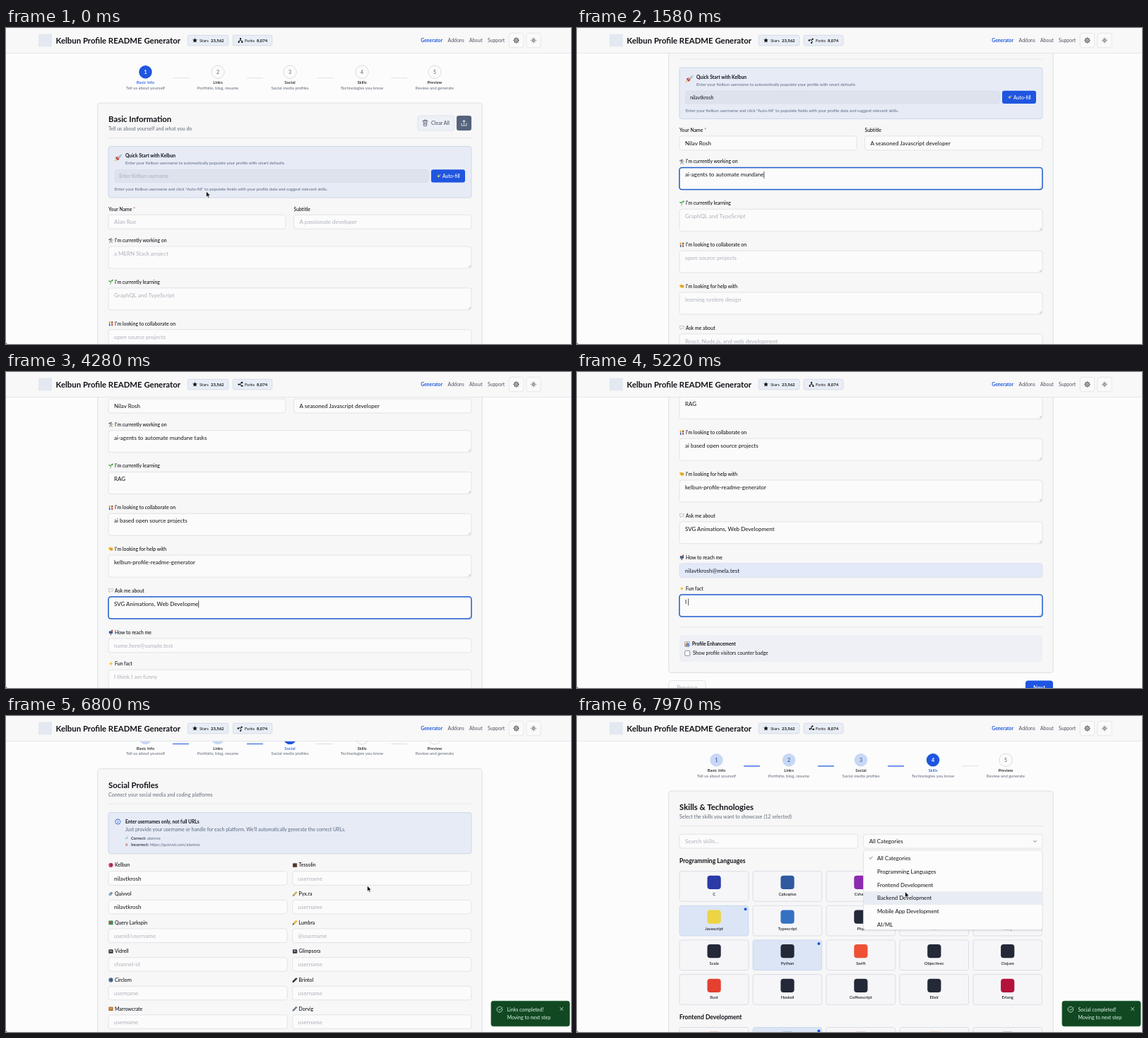
These frames come from a looping animation (800x447 px, 8000 ms). An HTML page:

```html
<!DOCTYPE html>
<html lang="en">
<head>
<meta charset="utf-8">
<title>Profile README Generator</title>
<style>
html, body { margin: 0; width: 100%; height: 100%; overflow: hidden; background: #fcfcfc; }
svg { display: block; width: 100%; height: 100%; }
text { font-family: Lato, "Open Sans", sans-serif; white-space: pre; }
</style>
</head>
<body>
<svg id="stage" viewBox="0 0 800 447"></svg>
<script>
const LOOP = 8000;
const BLUE = '#1f56e0', INK = '#111318', GREY = '#626a7a', PALE = '#adb2bc', LINE = '#dddfe5';
const BRAND = 'Kelbun', USER = 'nilavtkrosh';

// Drawing helpers
const T = (x, y, s, size, fill = INK, weight = 400, anchor = 'start') =>
  `<text x="${x}" y="${y}" font-size="${size}" fill="${fill}" font-weight="${weight}" text-anchor="${anchor}">${s}</text>`;
const R = (x, y, w, h, fill, stroke = 'none', rx = 3) =>
  `<rect x="${x}" y="${y}" width="${w}" height="${h}" rx="${rx}" fill="${fill}" stroke="${stroke}" stroke-width=".8"/>`;
const C = (x, y, r, fill, stroke = 'none') =>
  `<circle cx="${x}" cy="${y}" r="${r}" fill="${fill}" stroke="${stroke}" stroke-width=".8"/>`;
const P = (d, fill, stroke = 'none', w = .8) =>
  `<path d="${d}" fill="${fill}" stroke="${stroke}" stroke-width="${w}" stroke-linecap="round" stroke-linejoin="round"/>`;
const at = (x, y, body, scale = 1) => `<g transform="translate(${x} ${y}) scale(${scale})">${body}</g>`;
const head = (x, y, s, size) => T(x, y, s, size, INK, 700);
const rule = y => P(`M145 ${y}H659`, 'none', '#e2e4e8');

// Emoji in an 8 x 8 box
const EMOJI = {
  rocket: P('M2 6 5 2 8 0 7 3 3 7Z', '#b9c0cc') + P('M1 4 4 3 2 6ZM4 7 5 4 2 6Z', '#c8372d') + P('M0 8 1 6 2 7Z', '#f5a623'),
  scope: P('M0 2 5 0 6 2 1 4Z', '#7c8796') + P('M4 3 2 8M4 3 6 8', 'none', '#444b57') + C(7, 3.5, 1, '#d9a05b'),
  plant: P('M4 4Q1 5 0 2 3 1 4 4ZM4 3Q4 0 8 0 8 4 4 3Z', '#4caf50') + P('M4 3Q5 6 3 8', 'none', '#3f8f43'),
  pair: C(2, 2, 1.5, '#e3a63c') + C(6, 2, 1.5, '#8a5a2b') + P('M1 4H3V8H1Z', '#3c6fb5') + P('M5 4H7V8H5Z', '#c0503f'),
  hands: P('M0 2 3 1 8 3 7 6 4 7 1 5Z', '#f2b233') + P('M3 4 5 3 6 5', 'none', '#b97a16'),
  chat: P('M1 1H7V5H4L2 7V5H1Z', '#f4f5f7', '#a7adb8', .7),
  mail: P('M1 2H7V6H1Z', '#3a5f8f') + P('M5 0H7V3H5Z', '#c8372d') + P('M4 6V8', 'none', '#5c4632', 1.2),
  bolt: P('M5 0 1 5H4L3 8 7 3H4Z', '#f3b72b'),
  chart: R(0, 0, 8, 8, '#e4e7ec', '#8b93a1', 1) + P('M2 7V4', 'none', '#3b9a4c', 1.4) + P('M4 7V2', 'none', '#c8372d', 1.4) + P('M6 7V3', 'none', BLUE, 1.4),
};
const MINI = {
  o: (a, b) => C(4, 4, 3.6, a) + C(5, 3.4, 1.4, b),
  s: (a, b) => R(.4, 1, 7.2, 6.4, a, 'none', 1) + R(2, 2.4, 3.6, 2.6, b, 'none', .4),
  p: (a, b) => P('M0 8 1 5 6 0 8 2 3 7Z', a) + P('M0 8 1 5 3 7Z', b),
  b: (a, b) => P('M1 7Q0 3 3 2 5 0 6 2L8 3 6 4Q6 7 1 7Z', a) + C(5, 2.4, .7, b),
};
const emoji = key => EMOJI[key] || MINI[key[0]](...key.slice(1).split(','));

const label = (x, y, s, icon) =>
  (icon ? at(x, y - 6, emoji(icon), .87) : '') + T(icon ? x + 9 : x, y, s, 6.9, INK, 500);

// Group children: box, placeholder, value, caret, resize grip
const field = (id, x, y, w, h, hint, value = '', o = {}) => {
  const tx = x + (o.pad || 8), ty = y + (o.base || 12.9), size = o.size || 8;
  const grip = h > 25 ? P(`M${x + w - 4} ${y + h - 1.5}l2.6-2.6M${x + w - 2.4} ${y + h - 1.5}l1-1`, 'none', '#858a94', .5) : '';
  return `<g id="${id}" data-x="${tx}">` + R(x, y, w, h, o.fill || '#fbfbfb', o.fill ? '#d8deea' : LINE, 3.5) +
    T(tx, ty, value ? '' : hint, size, o.fill ? '#a5aec0' : PALE) + T(tx, ty, value, size) +
    P(`M0 ${ty - 7}v9`, 'none', 'none', .7) + grip + '</g>';
};

const STEPS = [['Basic Info', 'Tell us about yourself'], ['Links', 'Portfolio, blog, resume'], ['Social', 'Social media profiles'],
  ['Skills', 'Technologies you know'], ['Preview', 'Review and generate']];
const STEP_X = [197.5, 300, 402, 504, 607];
const steps = active => STEPS.map(([name, sub], i) => {
  const x = STEP_X[i], on = i === active, done = i < active;
  return C(x, 62.2, 9.2, on ? BLUE : done ? '#c8d8f4' : '#fbfbfb', on || done ? 'none' : '#cfd3dc') +
    T(x, 64.7, i + 1, 7, on ? '#fff' : done ? '#2a4fa8' : GREY, on ? 700 : 500, 'middle') +
    T(x, 79, name, 5.95, on ? BLUE : INK, 500, 'middle') + T(x, 86.8, sub, 5.95, GREY, 400, 'middle') +
    (i < 4 ? P(`M${[236.5, 341.5, 440.5, 545.5][i]} 70.8h22`, 'none', done ? BLUE : '#d9dce3', done ? 1.2 : .9) : '');
}).join('');

const footer = y => {
  const cols = [['About', `Create an awesome ${BRAND} profile README with ease.`], ['Quick Links', 'Generator'],
    ['Resources', BRAND + ' Repository'], ['Connect', BRAND]];
  return R(0, y, 800, 260, '#f7f7f7', '#dfe1e6', 0) + R(313.5, y + 16, 22, 22, '#e6e9f1', 'none', 1) +
    head(341.5, y + 30.7, BRAND + ' Profile README Generator', 9.4) +
    cols.map(([h, s], i) => head(46.5 + i * 181.5, y + 61.8, h, 7.4) + T(46.5 + i * 181.5, y + 78, s, 6.95, GREY)).join('') +
    T(46.5, y + 87, 'Made with', 6.95, GREY) + P(`M83.5 ${y + 87}l-3-3q0-3 3-1 3-2 3 1Z`, '#d93a3a') +
    T(89, y + 87, 'for the developer community.', 6.95, GREY);
};

const page = (i, title, sub, bottom, body) => `<g id="page${i}">` + steps(i) +
  R(129.8, 106, 544.4, bottom - 106, '#f7f7f7', '#d5d8e0', 4) +
  head(145, 133, title, 11.4) + T(145, 145.4, sub, 7.05, GREY) + rule(155.5) + body +
  R(129.8, bottom + 11, 52.5, 20, '#fbfbfb', LINE, 4) +
  T(156, bottom + 23.8, 'Previous', 7.9, i ? INK : PALE, 400, 'middle') +
  R(635, bottom + 11, 39, 20, BLUE, 'none', 4) + T(654.5, bottom + 23.8, 'Next', 8, '#fff', 500, 'middle') +
  footer(bottom + 46) + '</g>';

const extra = (y, icon, title, text) => rule(y) + R(145, y + 11.8, 514, 37.4, '#eef0f5') +
  at(152.5, y + 21, emoji(icon), .87) + head(163, y + 26.6, title, 6.7) +
  R(152.8, y + 33.8, 7, 7, '#fff', '#6f7480', 1) + T(164, y + 39.6, text, 6.95);

// Step pages
const AREAS = [['work', 309, 'scope', "I'm currently working on", 'a MERN Stack project'],
  ['learn', 367.8, 'plant', "I'm currently learning", 'GraphQL and TypeScript'],
  ['collab', 426.6, 'pair', "I'm looking to collaborate on", 'open source projects'],
  ['help', 485.4, 'hands', "I'm looking for help with", 'learning system design'],
  ['ask', 544.3, 'chat', 'Ask me about', 'React, Node.js, and web development'],
  ['fun', 647.5, 'bolt', 'Fun fact', 'I think I am funny']];

const basic = page(0, 'Basic Information', 'Tell us about yourself and what you do', 758,
  R(583, 124, 51.5, 21, '#edf0f6', '#d7ddea') + T(602, 137.4, 'Clear All', 7.1, '#414b5e') +
  P('M590 131.5h7M592 131.5v-1.4h3v1.4M591 131.5l.5 7h4l.5-7M592.8 133.5v3M594.3 133.5v3', 'none', '#414b5e', .7) +
  R(638, 124, 21, 21, '#55637c') + P('M645 135v3h7v-3M648.5 136v-5.5M646.3 132.5l2.2-2.2 2.2 2.2', 'none', '#fff') +
  R(145, 167.5, 514, 72.5, '#e6ebf5', '#c5d1e8') + at(153.5, 177.5, emoji('rocket'), 1.4) +
  head(169, 183.2, `Quick Start with ${BRAND}`, 6.7) +
  T(169, 193.2, `Enter your ${BRAND} username to automatically populate your profile with smart defaults`, 5.97, '#5c6984') +
  field('user', 153.7, 200.5, 444.5, 18, `Enter ${BRAND} username`, '', { fill: '#dde2ec', pad: 6.5, size: 6.9, base: 11.8 }) +
  R(602, 200.3, 48, 18.2, BLUE) + T(618, 212, 'Auto-fill', 6.9, '#fff', 500) +
  P('M612.5 207l.7 1.8 1.8.7-1.8.7-.7 1.8-.7-1.8-1.8-.7 1.8-.7Z', '#f0cf62') + C(614.8, 207.6, .6, '#fff') +
  T(153.7, 230, `Enter your ${BRAND} username and click "Auto-fill" to populate fields with your profile data and suggest relevant skills.`, 6, '#5c6984') +
  label(145, 258.7, 'Your Name <tspan fill="#c0504d">*</tspan>') + label(407.5, 258.7, 'Subtitle') +
  field('name', 145, 264.3, 251, 20, 'Alan Roe') + field('sub', 407.5, 264.3, 251.5, 20, 'A passionate developer') +
  AREAS.map(([id, y, icon, text, hint]) => label(145, y - 6.1, text, icon) + field(id, 145, y, 514, 31, hint)).join('') +
  label(145, 597, 'How to reach me', 'mail') + field('mail', 145, 603.2, 514, 20, 'name.here@sample.test') +
  extra(693, 'chart', 'Profile Enhancement', 'Show profile visitors counter badge'));

const links = page(1, 'Links', 'Share your portfolio, blog and resume', 344,
  [['folio', 'Portfolio URL', 'o#4a90d9,#7cc47f'], ['blog', 'Blog URL', 'p#f0c04a,#555'], ['cv', 'Resume URL', 's#e8eaee,#8b93a1']]
    .map(([id, text, icon], i) => label(145, 176 + i * 46, text, icon) +
      field(id, 145, 182 + i * 46, 514, 20, 'https://...')).join(''));

const SOCIAL = [[BRAND, 'o#c2416b,#7b2440', USER], ['Tessolin', 's#6a4a36,#3d2a1f'], ['Quivvol', 'b#8aa3b8,#39495a', USER], ['Pyx.ra', 'p#c9b458,#5f8f52'],
  ['Query Larkspin', 's#3f8d58,#c0503f', '', 'userid/username'], ['Lumbra', 'p#e8b13c,#4b3a26', '', '@username'],
  ['Vidrell', 's#32363e,#8c96a5', '', 'channel-id'], ['Glimpsora', 's#30343c,#8b93a1'], ['Circlorn', 'o#51708f,#2d4864'], ['Brintol', 'p#32363e,#111'],
  ['Marrowcrate', 's#b0723c,#d9a05b'], ['Dorvig', 'p#70808f,#3a5f8f'], ['Nimbrost', 'o#4a90d9,#fff'], ['Quandrel', 's#d69a2d,#333'],
  ['Bravorithm', 'bolt'], ['Snackril', 'p#d98a2b,#c0503f'], ['Apexorin', 'o#e3ab33,#c8372d'], ['Orbantalis', 'o#2f6fb5,#4caf50', '', '@username'],
  ['Learnwithelk', 'o#4caf50,#e8b13c'], ['Swatchel', 'o#b0723c,#c8372d'], ['Ardwell', 's#3a5f8f,#d98a2b'], ['Yapplin', 'chat', '', 'invite-code'],
  ['RSS Feed', 'p#70757f,#30343c', '', 'https://...']];
const social = page(2, 'Social Profiles', 'Connect your social media and coding platforms', 794.5,
  R(145, 168, 514, 58, '#e6ebf5', '#c5d1e8') + C(158.3, 180.8, 3.6, 'none', BLUE) + P('M158.3 180.5v2M158.3 178.9v.1', 'none', BLUE) +
  head(169, 183, 'Enter usernames only, not full URLs', 6.65) +
  T(169, 194.4, "Just provide your username or handle for each platform. We'll automatically generate the correct URLs.", 6.95, '#5c6984') +
  P('M169.4 204l1 1.2 1.8-3', 'none', '#3b9a4c', .7) + P('M169.5 212l2.4 3M171.9 212l-2.4 3', 'none', '#c0392b', .7) +
  T(177, 206.2, '<tspan font-weight="700" fill="#333b4c">Correct:</tspan> alanroe', 5.9, '#5c6984') +
  T(177, 215.8, '<tspan font-weight="700" fill="#333b4c">Incorrect:</tspan> https://quivvol.com/alanroe', 5.9, '#5c6984') +
  SOCIAL.map(([name, icon, value, hint], i) => {
    const x = i % 2 ? 405.6 : 145, y = 244.8 + (i >> 1) * 40.62;
    return label(x, y, name, icon) + field('soc' + i, x, y + 6.2, 253.2, 19.6, hint || 'username', value);
  }).join('') +
  extra(729, 'b#8aa3b8,#39495a', 'Quivvol Enhancement', 'Show Quivvol follow badge on profile'));

const SKILLS = [['C', '#2b3aa5'], ['Cplusplus', '#2f5a9e'], ['Csharp', '#8d2bb0'], ['Go', '#35a5c4'], ['Java', '#242938'],
  ['Javascript', '#ecd443'], ['Typescript', '#3571c2'], ['Php', '#242938'], ['Perl', '#242938'], ['Ruby', '#c8372d'],
  ['Scala', '#242938'], ['Python', '#242938'], ['Swift', '#ee5134'], ['Objectivec', '#242938'], ['Clojure', '#242938'],
  ['Rust', '#e3402f'], ['Haskell', '#242938'], ['Coffeescript', '#242938'], ['Elixir', '#242938'], ['Erlang', '#b3123c'],
  ['HTML', '#dc5a2e'], ['CSS', '#2f6fc4'], ['Sass', '#c4699a'], ['SVG', '#e0a030'], ['WebGL', '#9a2f2f']];
const MENU = ['All Categories', 'Programming Languages', 'Frontend Development', 'Backend Development', 'Mobile App Development', 'AI/ML'];
const skills = page(3, 'Skills &amp; Technologies', 'Select the skills you want to showcase (12 selected)', 1400,
  field('find', 145, 167.3, 253, 19.8, 'Search skills...') + R(405.6, 167.3, 253.4, 19.8, '#fbfbfb', LINE) +
  T(413.8, 180, 'All Categories', 7.85) + P('M646.5 176.3l2 2 2-2', 'none', '#555b68') +
  head(145, 208, 'Programming Languages', 8.6) + head(145, 429, 'Frontend Development', 8.6) +
  SKILLS.map(([name, color], i) => {
    const x = 145.2 + i % 5 * 103.9, row = i / 5 | 0, y = row < 4 ? 219.6 + row * 48.65 : 440.5;
    const on = [5, 11, 21].includes(i);
    return R(x, y, 97.6, 42.7, on ? '#dbe5f6' : '#f6f6f8', on ? '#c3d3f0' : '#d4d8e3') + R(x + 39.3, y + 6.2, 19.2, 19.2, color, 'none', 4) +
      T(x + 48.9, y + 34.6, name, 5.9, INK, 500, 'middle') + (on ? C(x + 93.3, y + 5, 2, BLUE) : '');
  }).join('') +
  '<g id="menu"><clipPath id="clip"><rect x="405" y="189" width="255" height="113"/></clipPath>' +
  R(405.6, 191.5, 253.4, 113, '#00000012') + R(405.6, 189.8, 253.4, 112.5, '#fcfcfc', '#d9dce3') + '<g clip-path="url(#clip)">' +
  R(406, 248.2, 252.6, 18.8, '#e8ecf3', 'none', 0) + P('M413.8 200.8l1.5 1.7 3-3.6', 'none', '#444b57', .7) +
  MENU.map((s, i) => T(425, 203.7 + i * 18.9, s, 7.8)).join('') + '</g></g>');

// Fixed parts
const header = R(-1, -1, 802, 36.6, '#f8f8f8', '#e0e2e6', 0) + R(46, 8.5, 19, 18, '#e4e8f0', 'none', 1) +
  head(70.5, 22, BRAND + ' Profile README Generator', 11.4) +
  R(257.3, 10.3, 57.5, 14.6, '#e9edf5', '#ced6e5', 2) + R(321.3, 10.3, 55.5, 14.6, '#e9edf5', '#ced6e5', 2) +
  P('M267.5 14l1 2.3 2.4.2-1.8 1.6.6 2.4-2.2-1.3-2.2 1.3.6-2.4-1.8-1.6 2.4-.2Z', INK) +
  T(274, 19.5, 'Stars', 5.9) + head(290, 19.5, '23,562', 5.9) + T(338, 19.5, 'Forks', 5.9) + head(355, 19.5, '8,074', 5.9) +
  `<g id="fork">${P('M0-2V0M-2.3 2V.6Q-2.3 0 0 0T2.3 .6V2', 'none', INK)}${C(0, -2.4, 1.2, INK)}${C(-2.3, 2.3, 1.2, INK)}${C(2.3, 2.3, 1.2, INK)}</g>` +
  T(587.3, 19.9, 'Generator', 6.75, BLUE, 700) +
  [[625.6, 'Addons'], [656, 'About'], [682, 'Support']].map(([x, s]) => T(x, 19.9, s, 6.9, '#4c5361')).join('') +
  R(712.3, 7.3, 20.4, 20.4, '#fafafa', '#e0e2e7') + R(736.8, 7.3, 20.4, 20.4, '#fafafa', '#e0e2e7') +
  C(722.5, 17.5, 2.9, 'none', INK) + C(722.5, 17.5, 1.1, 'none', INK) + C(747, 17.5, 1.5, 'none', INK) +
  Array.from({ length: 8 }, (_, i) =>
    `<path d="M0-2.9V-3.9" stroke="${INK}" stroke-width="1" transform="translate(722.5 17.5) rotate(${i * 45})"/>` +
    `<path d="M0-2.7V-3.8" stroke="${INK}" stroke-width=".7" transform="translate(747 17.5) rotate(${i * 45})"/>`).join('');

const toast = `<g id="toast">${R(687, 403.3, 111, 35.5, '#114822', '#15592c')}` +
  P('M702.8 414.3a3.9 3.9 0 1 1-1.8-2.6M697.5 414.8l1.5 1.5 4-4.3', 'none', '#d8f5e2') +
  T(709.5, 417.8, '', 7, '#e0f7e8') + T(709.5, 429.2, 'Moving to next step', 7, '#e0f7e8') +
  P('M784.6 412.4l4 4M788.6 412.4l-4 4', 'none', '#e0f7e8') + '</g>';

document.getElementById('stage').innerHTML = R(0, 0, 800, 447, '#fcfcfc', 'none', 0) + basic + links + social + skills + header + toast +
  P('M0 444.5q0 2.5 2.5 2.5H0Z', '#222') +
  `<g id="cursor"><path d="M0 0V8.2L1.9 6.5 3.2 9.4 4.6 8.8 3.3 6H5.8Z" fill="#000" stroke="#fff" stroke-width=".7"/></g>`;

// Timeline
const $ = id => document.getElementById(id);
const PAGE_AT = [0, 5740, 6520, 7640];
const SCROLL = [
  [[580, 0], [780, 111.5], [2780, 111.5], [2960, 226.3], [4560, 226.3], [4740, 332.5]],
  [[0, 0]],
  [[6620, 0], [6780, 31.3], [6860, 31.3], [7290, 477]],
  [[0, 0]],
];
const MOUSE = [[40, 283.5, 231], [140, 250, 208], [400, 250, 208], [480, 626, 209], [560, 626, 209], [780, 400, 190], [890, 300, 208],
  [1720, 300, 208], [1840, 285, 270], [2060, 285, 270], [2160, 290, 328], [2800, 290, 328], [2960, 285.5, 265], [3020, 285.5, 265], [3120, 288, 272],
  [3720, 288, 272], [3790, 288, 330], [4330, 288, 330], [4430, 290, 386], [4600, 280, 392], [5080, 300, 328],
  [5570, 300, 328], [5700, 655, 442], [5780, 655, 442], [5890, 300, 190], [6370, 300, 190], [6480, 655, 364], [6540, 655, 364],
  [6760, 511.5, 240], [6840, 511.5, 240], [7390, 205.5, 301.5], [7440, 205.5, 301.5], [7590, 655, 338], [7650, 655, 338], [7770, 530, 177], [7960, 464.5, 248.5]];
// id, text, focus, typing start, typing end, blur
const TYPING = [
  ['user', USER, 150, 180, 380, 480],
  ['work', 'ai-agents to automate mundane tasks', 890, 940, 1710, 1850],
  ['learn', 'RAG', 1850, 1900, 2030, 2165],
  ['collab', 'ai based open source projects', 2165, 2210, 2740, 3120],
  ['help', BRAND.toLowerCase() + '-profile-readme-generator', 3120, 3180, 3700, 3795],
  ['ask', 'SVG Animations, Web Development', 3795, 3840, 4300, 4435],
  ['mail', USER + '@mela.test', 4435, 4640, 4641, 5090],
  ['fun', 'I dream in SVG and CSS filters', 5090, 5190, 5600, 5740],
  ['folio', 'https://nilavtkrosh.test', 5890, 5950, 6340, 6480],
  ['name', 'Nilav Rosh', 0, 540, 541, 0],
  ['sub', 'A seasoned Javascript developer', 0, 540, 541, 0],
];
const TOASTS = [['Basic Info', 5780, 6480], ['Links', 6560, 7250], ['Social', 7680, 9000]];

const clamp = v => Math.max(0, Math.min(1, v));
const ease = p => p * p * (3 - 2 * p);
function track(keys, t, k = 1) {
  let i = 0;
  while (i < keys.length - 1 && keys[i + 1][0] <= t) i++;
  const a = keys[i], b = keys[i + 1] || a;
  return a[k] + (b[k] - a[k]) * ease(clamp((t - a[0]) / (b[0] - a[0] || 1)));
}

function type([id, text, focus, start, end, blur], t) {
  const g = $(id), [box, hint, value, caret] = g.children;
  const shown = text.slice(0, Math.floor(clamp((t - start) / (end - start)) * text.length));
  const on = t >= focus && t < blur;
  value.textContent = shown;
  hint.style.display = shown ? 'none' : '';
  box.setAttribute('stroke', on ? '#1e5bd0' : id === 'user' ? '#d8deea' : LINE);
  box.setAttribute('stroke-width', on ? 1.5 : .8);
  if (id === 'mail') box.setAttribute('fill', shown ? '#e2e9f9' : '#fbfbfb');
  caret.setAttribute('stroke', on && t < end + 60 ? INK : 'none');
  caret.setAttribute('transform', `translate(${+g.dataset.x + (shown ? value.getComputedTextLength() : 0) + .4} 0)`);
}

function draw(t) {
  const now = PAGE_AT.filter(s => t >= s).length - 1;
  PAGE_AT.forEach((_, i) => $('page' + i).style.display = i === now ? '' : 'none');
  $('page' + now).setAttribute('transform', `translate(0 ${-track(SCROLL[now], t)})`);
  TYPING.forEach(row => type(row, t));
  $('menu').style.display = t >= 7810 ? '' : 'none';
  $('fork').setAttribute('transform', `translate(332 17.5) rotate(${t / 745.7 * 360 % 360})`);

  const note = TOASTS.find(n => t >= n[1] && t < n[2]), box = $('toast');
  box.style.display = note ? '' : 'none';
  if (note) {
    box.querySelector('text').textContent = note[0] + ' completed!';
    box.setAttribute('transform', `translate(${115 * (1 - ease(clamp((t - note[1]) / 120)))} 0)`);
  }

  const hidden = TYPING.some(([id, , focus, start, end, blur]) => id !== 'mail' && blur && t > focus + 20 && t < end + 15);
  $('cursor').style.display = hidden ? 'none' : '';
  $('cursor').setAttribute('transform', `translate(${track(MOUSE, t)} ${track(MOUSE, t, 2)})`);
}

const origin = performance.now();
function tick() {
  draw((performance.now() - origin) % LOOP);
  requestAnimationFrame(tick);
}
tick();
</script>
</body>
</html>
```
